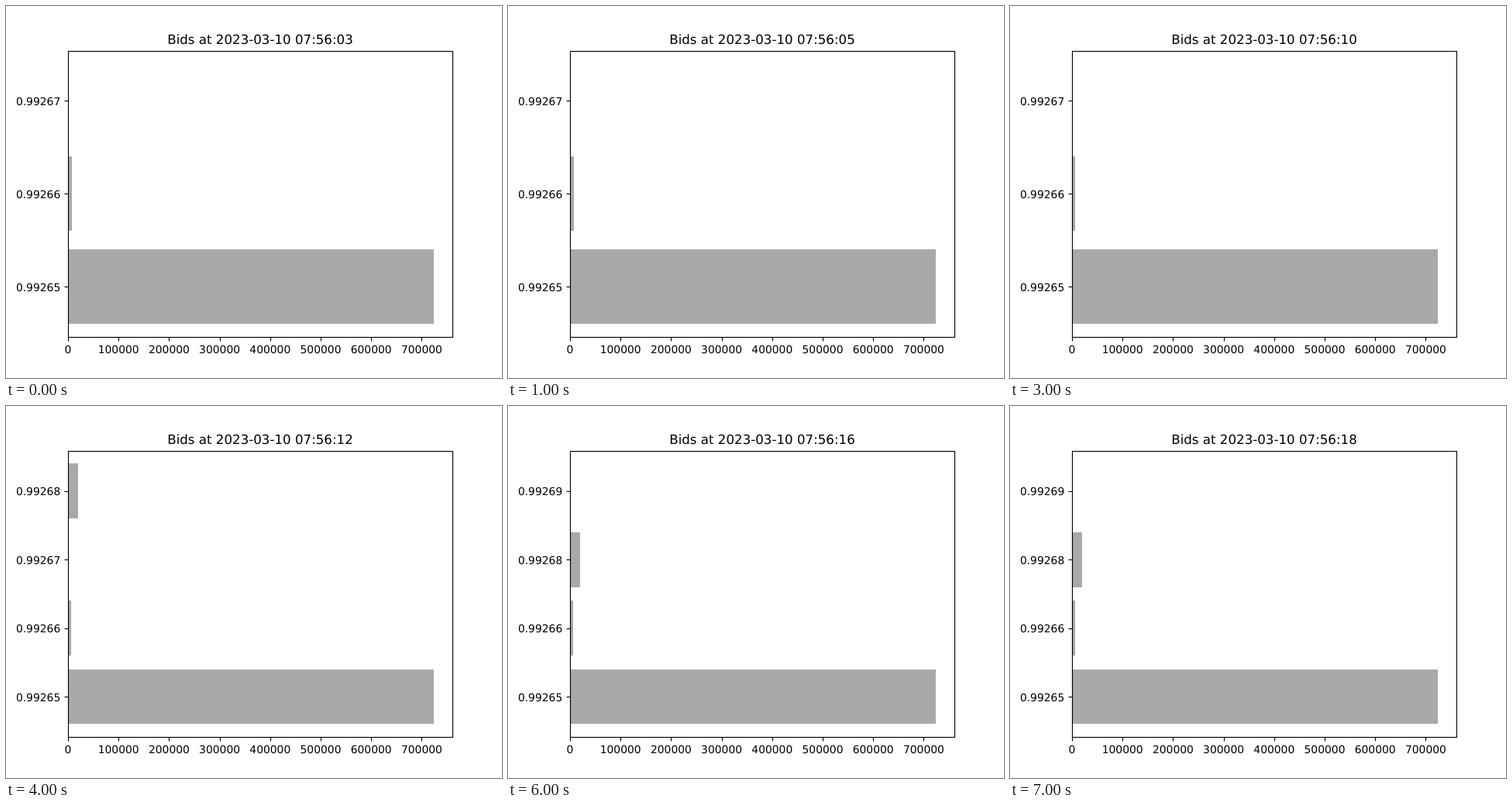
An HTML page that plays this animation: 640 px wide and 480 px high, repeating every 8000 ms.

```html
<!DOCTYPE html>
<html lang="en">
<head>
<meta charset="utf-8">
<title>Bids</title>
<style>
  html, body { margin: 0; width: 100%; height: 100%; overflow: hidden; background: #fff; }
  svg { display: block; width: 640px; height: 480px; }
  text { font: 13.889px "DejaVu Sans", sans-serif; text-rendering: geometricPrecision; }
  .title { font-size: 16.667px; }
  .bar { fill: #a9a9a9; shape-rendering: crispEdges; }
  .line { fill: none; stroke: #000; stroke-width: 1.11; }
</style>
</head>
<body>
<svg viewBox="0 0 640 480">
  <g id="bars"></g>
  <g id="axis"></g>
  <rect class="line" x="80.5" y="58.5" width="496" height="369"/>
  <text id="title" class="title" x="328" y="49" text-anchor="middle"></text>
</svg>
<script>
const LEFT = 80, TOP = 57.6, BOTTOM = 427.2, UNIT = 65.2, STEP = 1000;

// Each book lists [price, bar width in px] from the bottom up.
const opening = [["0.99265", 472], ["0.99266", 5], ["0.99267", 0]];
const reduced = [["0.99265", 472], ["0.99266", 4], ["0.99267", 0]];
const raised = [...reduced, ["0.99268", 13]];
const settled = [["0.99265", 472], ["0.99266", 4], ["0.99268", 13], ["0.99269", 0]];

const steps = [
  ["03", opening], ["05", opening], ["07", opening], ["10", reduced],
  ["12", raised], ["14", settled], ["16", settled], ["18", settled]
];

const byId = id => document.getElementById(id);
const bars = byId("bars"), axis = byId("axis"), title = byId("title");

const tick = d => `<path class="line" d="${d}"/>`;
const label = (x, y, anchor, text) =>
  `<text x="${x}" y="${y}" text-anchor="${anchor}">${text}</text>`;

let xAxis = "";
for (let i = 0; i <= 7; i++) {
  const x = LEFT + i * UNIT;
  xAxis += tick(`M${Math.round(x) + 0.5} 427.5v5`) + label(x, 448, "middle", i * 100000);
}

function drawBook(book) {
  // Bars are 0.8 high; the view adds a 5% margin at both ends.
  const span = book.length - 0.2;
  const unit = (BOTTOM - TOP) / (span * 1.1);
  let shapes = "", yAxis = "";
  book.forEach(([price, width], i) => {
    const y = BOTTOM - (i + 0.4 + span * 0.05) * unit;
    const top = Math.round(y - 0.4 * unit);
    const height = Math.round(y + 0.4 * unit) - top;
    if (width) {
      shapes += `<rect class="bar" x="${LEFT}" y="${top}" width="${width}" height="${height}"/>`;
    }
    yAxis += tick(`M80.5 ${Math.round(y) + 0.5}h-5`) +
      label(70.28, Math.round(y + 5.5), "end", price);
  });
  bars.innerHTML = shapes;
  axis.innerHTML = xAxis + yAxis;
}

let shown = -1, shownBook = null;
function render(time) {
  const index = Math.floor(time / STEP) % steps.length;
  if (index === shown) return;
  shown = index;
  const [seconds, book] = steps[index];
  title.textContent = `Bids at 2023-03-10 07:56:${seconds}`;
  if (book !== shownBook) drawBook(shownBook = book);
}

const start = performance.now();
function loop() {
  render(performance.now() - start);
  requestAnimationFrame(loop);
}
loop();
</script>
</body>
</html>
```
